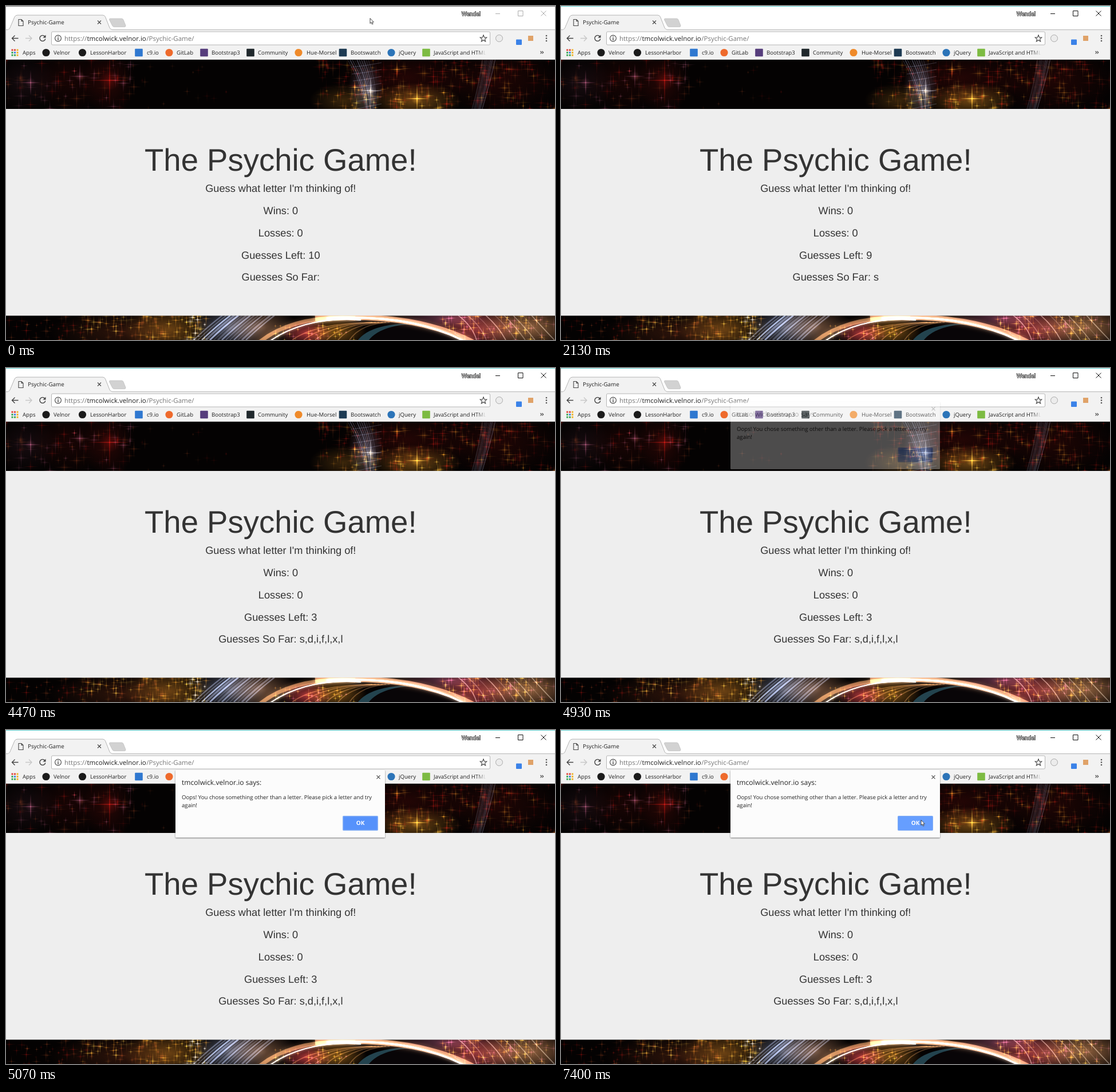
These frames come from a looping animation (959x584 px, 8000 ms). An HTML page with a canvas:

```html
<!DOCTYPE html>
<html lang="en">
<head>
<meta charset="utf-8">
<title>Psychic-Game</title>
<style>
  html, body { margin: 0; width: 100%; height: 100%; overflow: hidden; background: #eee; }
  canvas, svg { position: absolute; left: 0; top: 0; width: 959px; height: 584px; }
  text { white-space: pre; text-rendering: geometricPrecision; }
  .ui { font-family: "Open Sans", "Noto Sans", sans-serif; font-size: 9.65px; fill: #222; }
  .page { font-family: "Liberation Sans", Arial, sans-serif; font-size: 18.2px; fill: #333; text-anchor: middle; }
  .line { fill: none; stroke: #444; stroke-width: 1.4; }
  .thin { stroke-width: 1.1; }
</style>
</head>
<body>
<canvas id="sky" width="959" height="584"></canvas>
<svg viewBox="0 0 959 584">
  <defs>
    <linearGradient id="fade"><stop offset=".8" stop-color="#222"/><stop offset="1" stop-color="#222" stop-opacity="0"/></linearGradient>
    <filter id="shadow" x="-5%" y="-10%" width="110%" height="125%">
      <feDropShadow dx="0" dy="1" stdDeviation="1.2" flood-color="#000" flood-opacity=".5"/>
    </filter>
  </defs>

  <!-- window frame and tab -->
  <path fill="#fff" d="M0 0H959V42H0Z"/>
  <path fill="#5fd0d0" d="M0 0H959V1H0Z"/>
  <path id="edgeIdle" fill="#6e6e6e" d="M0 0H959V1H0Z"/>
  <path fill="#f2f2f2" d="M0 41.500H959V94H0Z"/>
  <path fill="#f2f2f2" stroke="#b4b4b4" d="M0 41.500H3Q6 41 7 38L15 19Q16.500 16 20 16H169Q172 16 173.500 19L181 38Q182.500 41.500 186 41.500H959"/>
  <path fill="#f2f2f2" d="M4 41H184V43H4Z"/>
  <path fill="#d2d2d2" stroke="#bdbdbd" stroke-width=".7" d="M182 22H202Q204 22 205 24L209 34Q209.500 36.500 207 36.500H189Q186.500 36.500 185.500 34L180.500 24Q180 22 182 22Z"/>
  <path class="line thin" d="M22 23.500H27L30 26.500V34.500H22ZM27 23.500V26.500H30"/>
  <path class="line thin" d="M160 25.500L166 31.500M166 25.500L160 31.500"/>
  <text class="ui" x="38" y="32" style="font-size:9.8px">Psychic-Game</text>
  <text class="ui" x="796" y="16.500" style="font-size:9.4px;fill:#fff;stroke:#333;stroke-width:1.5px;paint-order:stroke">Wendel</text>
  <path id="controls" fill="none" stroke="#111" d="M855 13.500H863M894.500 8.500H903V17.500H894.500ZM934.500 8.500L943.500 17.500M943.500 8.500L934.500 17.500"/>

  <!-- toolbar -->
  <path class="line" d="M21.500 56.500H10.500M15.500 51.500L10.500 56.500L15.500 61.500"/>
  <path class="line" style="stroke:#c8c8c8" d="M34 56.500H45M40 51.500L45 56.500L40 61.500"/>
  <path class="line" d="M67.800 53.200A5 5 0 1 0 68.800 57.500"/>
  <path fill="#444" d="M69.500 50.500V55.500H64.500Z"/>
  <rect x="79.500" y="45" width="766" height="23" rx="2" fill="#fff" stroke="#b5b5b5"/>
  <circle class="line thin" cx="91" cy="56.500" r="5.400"/>
  <path class="line" d="M91 55.500V60M91 53V54.400"/>
  <g class="ui" style="font-size:11.5px">
    <text x="102" y="60.700" fill="#777">https://</text>
    <text x="141.500" y="60.700">tmcolwick.velnor.io</text>
    <text x="245.300" y="60.700" fill="#777">/Psychic-Game/</text>
  </g>
  <path class="line thin" d="M834 50.800L835.600 54.900L839.800 55.100L836.500 57.900L837.600 62L834 59.700L830.400 62L831.500 57.900L828.200 55.100L832.400 54.900Z"/>
  <circle cx="861.500" cy="56.500" r="6" fill="#ececec" stroke="#aaa"/>
  <rect x="891" y="58.500" width="10" height="9.500" rx="1" fill="#3b82e8"/>
  <rect x="912" y="52" width="9" height="9" fill="#e0a268"/>
  <g fill="#555"><circle cx="944" cy="52" r="1.300"/><circle cx="944" cy="56.500" r="1.300"/><circle cx="944" cy="61" r="1.300"/></g>

  <g id="bookmarks" class="ui"></g>
  <path class="line thin" d="M933.500 79L935.700 81.200L933.500 83.400M936.500 79L938.700 81.200L936.500 83.400"/>
  <path fill="#c6c6c6" d="M0 93H959V94H0Z"/>

  <!-- page -->
  <path fill="#eee" d="M0 180H959V541.500H0Z"/>
  <g class="page">
    <text x="479.800" y="287.500" style="font-size:54.5px">The Psychic Game!</text>
    <text x="479.800" y="325.350">Guess what letter I'm thinking of!</text>
    <text x="479.800" y="364.100">Wins: 0</text>
    <text x="479.800" y="402.850">Losses: 0</text>
    <g id="guesses"></g>
  </g>

  <!-- alert -->
  <g id="dialog">
    <rect x="296" y="70" width="366" height="118" rx="1.500" fill="#fcfcfc" filter="url(#shadow)"/>
    <g class="ui">
      <text x="307" y="95.500" style="font-size:12.1px">tmcolwick.velnor.io says:</text>
      <text x="307" y="121">Oops! You chose something other than a letter. Please pick a letter and try</text>
      <text x="307" y="135">again!</text>
    </g>
    <path class="line thin" d="M647.500 79.300L653.500 85.300M653.500 79.300L647.500 85.300"/>
    <rect x="588.750" y="150.750" width="60.500" height="24.500" rx="1" fill="#5692fb" stroke="#83aef5" stroke-width="1.500"/>
    <rect id="hover" x="589.500" y="151.500" width="59" height="23" fill="#669eff"/>
    <text class="ui" x="619" y="165.800" text-anchor="middle" style="font-size:10px;font-weight:700;fill:#fff">OK</text>
  </g>

  <path id="cursor" fill="#fff" stroke="#333" stroke-width=".9" d="M.5 .5V9.500L2.500 7.600L4 11L5.500 10.400L4.100 7.100H6.800Z"/>
</svg>

<script>
const LOOP = 8000;
const byId = id => document.getElementById(id);

// Each step is [time in ms, style]; the style holds until the next step.
function hold(el, steps) {
  const frames = steps.map(([time, style]) => ({ ...style, offset: time / LOOP, easing: 'steps(1, end)' }));
  frames.push({ ...steps.at(-1)[1], offset: 1 });
  el.animate(frames, { duration: LOOP, iterations: Infinity });
}
const move = (x, y, opacity = 1) => ({ transform: `translate(${x}px, ${y}px)`, opacity });
const show = opacity => ({ opacity });

// Bookmarks: label, text x, icon colour, icon centre, shape
const bookmarks = [
  ['Velnor', 83, '#1b1b1b', 70, 'circle'],
  ['LessonHarbor', 147, '#1b1b1b', 133.5, 'circle'],
  ['c9.io', 246, '#2f78d0', 232, 'square'],
  ['GitLab', 298, '#ee6a2c', 285, 'circle'],
  ['Bootstrap3', 359, '#563d7c', 346, 'square'],
  ['Community', 440, '#20282c', 427, 'square'],
  ['Hue-Morsel', 525, '#ef8a2a', 511, 'circle'],
  ['Bootswatch', 602, '#1d3a52', 588.5, 'square'],
  ['jQuery', 686, '#2c74b8', 673, 'circle'],
  ['JavaScript and HTML', 747, '#7dbb42', 734, 'square'],
];
const appColors = ['#e0453a', '#e0453a', '#f0b429', '#3aa757', '#4285e8', '#f0b429', '#3aa757', '#3aa757', '#f0b429'];
byId('bookmarks').innerHTML =
  appColors.map((c, i) => `<rect x="${9.5 + i % 3 * 4.5}" y="${75.5 + (i / 3 | 0) * 4.5}" width="3" height="3" fill="${c}"/>`).join('') +
  '<text x="29" y="84.8">Apps</text>' +
  bookmarks.map(([label, x, color, cx, shape], i) =>
    (shape === 'circle'
      ? `<circle cx="${cx}" cy="81.5" r="6.6" fill="${color}"/>`
      : `<rect x="${cx - 6.8}" y="74.7" width="13.6" height="13.6" rx="1" fill="${color}"/>`) +
    `<text x="${x}" y="84.8"${i === bookmarks.length - 1 ? ' style="fill:url(#fade)"' : ''}>${label}</text>`).join('');

// Guessed letters
const letters = ['s', 'd', 'i', 'f', 'l', 'x', 'l'];
const guessTimes = [0, 2130, 2800, 3200, 3330, 3600, 3930, 4470];
byId('guesses').innerHTML = guessTimes.map((_, n) => `<g>
  <text x="479.8" y="441.6">Guesses Left: ${10 - n}</text>
  <text x="479.8" y="480.1">Guesses So Far:${n ? ' ' + letters.slice(0, n).join(',') : ''}</text></g>`).join('');
[...byId('guesses').children].forEach((group, n) => {
  const steps = n ? [[0, show(0)], [guessTimes[n], show(1)]] : [[0, show(1)]];
  if (n + 1 < guessTimes.length) steps.push([guessTimes[n + 1], show(0)]);
  hold(group, steps);
});

hold(byId('edgeIdle'), [[0, show(1)], [800, show(0)]]);
hold(byId('controls'), [[0, show(.35)], [800, show(1)]]);
hold(byId('dialog'), [[0, move(0, -12, 0)], [4930, move(0, -11, .3)], [5000, move(0, -5, .8)], [5070, move(0, 0)]]);
hold(byId('hover'), [[0, show(0)], [7130, show(1)]]);
hold(byId('cursor'), [
  [0, 635.5, 21], [200, 639, 20], [270, 655, 19.5], [330, 681, 20], [400, 709, 21], [470, 725, 21], [1130, 725, 21, 0],
  [6130, 886.5, 33.5], [6200, 868, 34], [6270, 838, 34], [6330, 799, 34.5], [6400, 761, 35], [6470, 742, 35],
  [6670, 740, 38], [6730, 734, 46], [6800, 722, 60], [6870, 706, 79], [6930, 688, 100], [7000, 670, 121],
  [7070, 653, 140], [7130, 641, 154], [7200, 634, 164], [7270, 630, 168], [7330, 629, 163], [7400, 628.5, 157],
].map(([time, ...pose]) => [time, move(...pose)]));

// Starry backdrop
const ctx = byId('sky').getContext('2d');
let seed = 11;
const rand = (a = 0, b = 1) => {
  seed = (seed * 16807) % 2147483647;
  return a + (b - a) * seed / 2147483647;
};
const rgba = (rgb, alpha) => `rgba(${rgb},${alpha})`;

function glow(x, y, rx, ry, rgb, alpha) {
  ctx.save();
  ctx.translate(x, y);
  ctx.scale(rx, ry);
  const g = ctx.createRadialGradient(0, 0, 0, 0, 0, 1);
  g.addColorStop(0, rgba(rgb, alpha));
  g.addColorStop(1, rgba(rgb, 0));
  ctx.fillStyle = g;
  ctx.fillRect(-1, -1, 2, 2);
  ctx.restore();
}
function star(x, y, size, rgb, alpha) {
  glow(x, y, size, .9, rgb, alpha);
  glow(x, y, .9, size * 1.2, rgb, alpha);
  glow(x, y, size * .4, size * .4, rgb, alpha * .3);
}
function scatter(count, x0, x1, y0, y1, colors, alpha, size) {
  for (let i = 0; i < count; i++) {
    star(rand(x0, x1), rand(y0, y1), rand(.3, 1) * size, colors[rand(0, colors.length) | 0], rand(.2, 1) * alpha);
  }
}
function curve([x0, y0, cx, cy, x1, y1], width, rgb, alpha, blur = 0) {
  ctx.beginPath();
  ctx.moveTo(x0, y0);
  ctx.quadraticCurveTo(cx, cy, x1, y1);
  ctx.lineWidth = width;
  ctx.strokeStyle = ctx.shadowColor = rgba(rgb, alpha);
  ctx.shadowBlur = blur;
  ctx.stroke();
  ctx.shadowBlur = 0;
}
function band(y, height, paint) {
  ctx.save();
  ctx.beginPath();
  ctx.rect(0, y, 959, height);
  ctx.clip();
  ctx.fillStyle = '#040202';
  ctx.fillRect(0, y, 959, height);
  ctx.globalCompositeOperation = 'lighter';
  paint();
  ctx.restore();
}

const RED = '170,20,15', RUST = '150,65,30', PINK = '175,90,125', AMBER = '215,140,35', GOLD = '250,205,70', ICE = '185,200,240', WHITE = '255,250,240';

band(94, 86, () => {
  glow(180, 132, 45, 60, RED, .2);
  glow(110, 130, 70, 60, RED, .12);
  glow(35, 135, 55, 50, PINK, .1);
  scatter(75, 0, 235, 94, 180, [RED, RUST, PINK], .38, 18);
  scatter(14, 235, 400, 94, 180, [RED, RUST], .25, 10);
  star(43, 134, 22, PINK, .75);
  star(129, 123, 22, PINK, .75);
  star(181, 130, 45, RED, .9);
  star(205, 135, 16, PINK, .5);
  glow(715, 166, 80, 32, AMBER, .45);
  glow(590, 165, 60, 30, AMBER, .25);
  glow(700, 125, 120, 50, RED, .18);
  glow(860, 130, 110, 60, RED, .16);
  glow(628, 145, 30, 55, ICE, .25);
  scatter(230, 535, 959, 94, 180, [RED, RED, RUST, AMBER], .42, 18);
  scatter(45, 560, 780, 138, 182, [AMBER, GOLD], .55, 13);
  for (let i = 0; i < 10; i++) {
    curve([597 + i * 4, 94, 620 + i * 3, 132, 629 + i * 2, 180], 1, ICE, rand(.1, .4), 2);
    curve([832 + i * 2.5, 94, 828 + i * 2, 132, 814 + i * 2, 180], .9, ICE, rand(.1, .3), 1);
  }
  for (let i = 0; i < 7; i++) {
    const y = 102 + i * 12;
    curve([602 + i * 2, y + 5, 628, y + 3, 656, y - 3], .9, ICE, .25);
  }
  star(637, 148, 26, WHITE, .8);
  star(718, 162, 26, GOLD, 1);
  star(683, 111, 16, AMBER, .8);
});

band(541, 43, () => {
  glow(205, 570, 130, 40, RUST, .28);
  glow(285, 565, 80, 42, AMBER, .4);
  scatter(40, 0, 160, 541, 584, [RED, RUST], .4, 12);
  scatter(110, 130, 350, 541, 584, [RUST, AMBER, GOLD], .5, 13);
  scatter(18, 295, 350, 541, 584, [WHITE, GOLD], .75, 13);
  glow(390, 562, 65, 40, ICE, .4);
  glow(445, 562, 65, 35, '210,150,110', .5);
  for (let i = 0; i < 14; i++) {
    const x = 328 + i * 7;
    curve([x, 584, x + 25, 560, x + 50, 541], rand(.8, 4), ICE, rand(.12, .5), 2);
  }
  glow(525, 572, 45, 24, '225,70,75', .7);
  glow(575, 570, 55, 28, AMBER, .55);
  scatter(45, 470, 610, 558, 584, [PINK, AMBER, GOLD], .6, 9);
  glow(820, 565, 80, 40, '220,80,85', .65);
  glow(765, 546, 80, 18, PINK, .5);
  glow(910, 562, 90, 40, '220,150,95', .65);
  scatter(100, 760, 959, 541, 584, [PINK, AMBER, GOLD], .55, 13);
  for (let i = 0; i < 9; i++) {
    curve([790 + i * 16, 541, 815 + i * 15, 560, 822 + i * 17, 584], 1.5, WHITE, rand(.1, .35), 2);
  }

  // Dark disc under the bright arcs
  ctx.globalCompositeOperation = 'source-over';
  for (const [x, color] of [[696, '#23434e'], [715, '#080507']]) {
    ctx.fillStyle = color;
    ctx.beginPath();
    ctx.ellipse(x, 598, 86, 42, 0, 0, 7);
    ctx.fill();
  }
  ctx.globalCompositeOperation = 'lighter';
  for (let i = 0; i < 6; i++) {
    curve([500 + i * 20, 584, 540 + i * 16, 555, 640 + i * 6, 553], 1.5, '225,160,100', .3, 2);
  }
  curve([440, 590, 500, 540, 610, 546], 7, '200,140,90', .6, 8);
  curve([455, 590, 520, 542, 620, 549], 2, WHITE, .8, 4);
  curve([540, 546, 710, 534, 815, 588], 10, '205,145,105', .7, 8);
  curve([560, 546, 710, 538, 800, 586], 3, WHITE, .8, 5);
});
</script>
</body>
</html>
```
